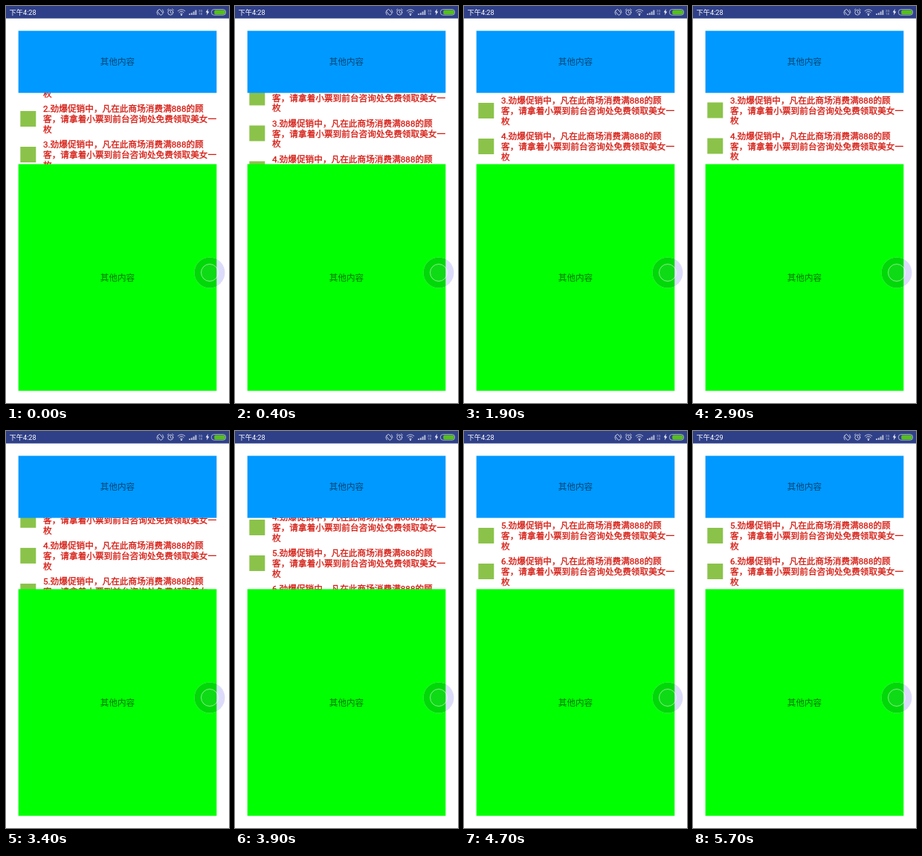
An HTML page that plays this animation: 300x533 px, repeating every 5800 ms.

```html
<!DOCTYPE html>
<html lang="zh-CN">
<head>
<meta charset="utf-8">
<style>
  html, body { margin: 0; width: 100%; height: 100%; overflow: hidden; background: #fff; }
  svg { display: block; width: 100vw; height: 100vh; }
  text { font-family: Roboto, "Noto Sans CJK SC", "Noto Sans CJK", sans-serif; }
  .notice { font-size: 11.67px; fill: #d4180f; stroke: #d4180f; stroke-width: .3px; }
  .label { font-size: 11.6px; fill: #000; fill-opacity: .56; text-anchor: middle; }
</style>
</head>
<body>
<svg viewBox="0 0 300 533">
  <defs>
    <clipPath id="window"><rect x="16" y="116" width="268" height="97"/></clipPath>
    <clipPath id="overCard"><rect x="250" y="330" width="33.33" height="60"/></clipPath>
  </defs>
  <rect width="300" height="533" fill="#fff"/>
  <g clip-path="url(#window)"><g id="list"></g></g>

  <rect x="16.67" y="33.33" width="266.67" height="83.33" fill="#0099ff"/>
  <rect x="16.67" y="212.33" width="266.67" height="304.33" fill="#00ff00"/>
  <text class="label" x="150" y="79.3">其他内容</text>
  <text class="label" x="150" y="369">其他内容</text>

  <!-- floating button -->
  <circle cx="274" cy="358" r="20.5" fill="#dcdcfa"/>
  <circle cx="274" cy="358" r="20.5" fill="#00d808" clip-path="url(#overCard)"/>
  <circle cx="274" cy="358" r="11.5" fill="#fff" fill-opacity=".06" stroke="#fff" stroke-opacity=".5" stroke-width="1"/>

  <!-- status bar -->
  <rect width="300" height="16.67" fill="#2f4088"/>
  <text id="clock" x="4.6" y="12" font-size="9.2" fill="#fff"></text>
  <g fill="none" stroke="#fff" stroke-opacity=".85" stroke-width=".8" stroke-linecap="round">
    <rect x="205.2" y="4.6" width="4.4" height="7.6" rx="1" transform="rotate(-40 207.4 8.4)"/>
    <path d="M202.8 8.2l1.4 3.6M212 8.6l-1.4-3.6"/>
    <circle cx="221.3" cy="8.6" r="3.5"/>
    <path d="M221.3 6.7v2.1l1.4.9M217.2 5.4l1.7-1.5M225.4 5.4l-1.7-1.5"/>
    <path d="M231.2 6.6a7 7 0 0 1 9.6 0M232.9 8.6a4.6 4.6 0 0 1 6.2 0M234.6 10.4a2 2 0 0 1 2.8 0"/>
  </g>
  <circle cx="236" cy="12" r=".9" fill="#fff"/>
  <path d="M246 10.2h2v1.8h-2zM248.8 9.2h2v2.8h-2zM251.6 7.6h2v4.4h-2zM254.4 5.6h2v6.4h-2z" fill="#fff" fill-opacity=".65"/>
  <text x="259" y="7.8" font-size="4.4" fill="#fff" fill-opacity=".7">2G</text>
  <text x="259" y="12.4" font-size="4.4" fill="#fff" fill-opacity=".7">1X</text>
  <path d="M271.8 3.8l-3 4.8h2l-.9 3.8 3.3-5h-2z" fill="#fff"/>
  <rect x="276.4" y="4.6" width="19.2" height="7.6" rx="3.4" fill="none" stroke="#fff" stroke-opacity=".7" stroke-width=".8"/>
  <rect x="280.2" y="5.4" width="14.6" height="6" rx="2" fill="#55c01c"/>
</svg>
<script>
  const LOOP = 5800, TICK = 100, ROW = 48;
  const SCROLLS = [{ start: -885, end: 1190 }, { start: 2810, end: 4710 }];
  const CLOCK_CHANGE = 5700;
  const list = document.getElementById('list');
  const clock = document.getElementById('clock');

  function addNotice(number) {
    const lines = [
      number + '.劲爆促销中，凡在此商场消费满888的顾',
      '客，请拿着小票到前台咨询处免费领取美女一',
      '枚'
    ];
    const y = number * ROW;
    list.innerHTML += `<rect x="19.3" y="${y + 130}" width="21" height="21" fill="#8bc34a"/>` +
      lines.map((line, i) =>
        `<text class="notice" x="50" y="${(y + 131.4 + i * 13.7).toFixed(1)}">${line}</text>`).join('');
  }

  // Accelerate, then decelerate.
  function ease(u) {
    const v = Math.min(1, Math.max(0, u));
    return (1 - Math.cos(Math.PI * v)) / 2;
  }

  function render(ms) {
    const t = Math.floor((ms % LOOP) / TICK) * TICK;
    const top = SCROLLS.reduce(
      (row, { start, end }) => row + 2 * ease((t - start) / (end - start)), 1);
    list.setAttribute('transform', `translate(0 ${(-top * ROW).toFixed(2)})`);
    clock.textContent = t < CLOCK_CHANGE ? '下午4:28' : '下午4:29';
  }

  for (let n = 1; n <= 6; n++) addNotice(n);
  const begin = performance.now();
  function loop() {
    render(performance.now() - begin);
    requestAnimationFrame(loop);
  }
  loop();
</script>
</body>
</html>
```
